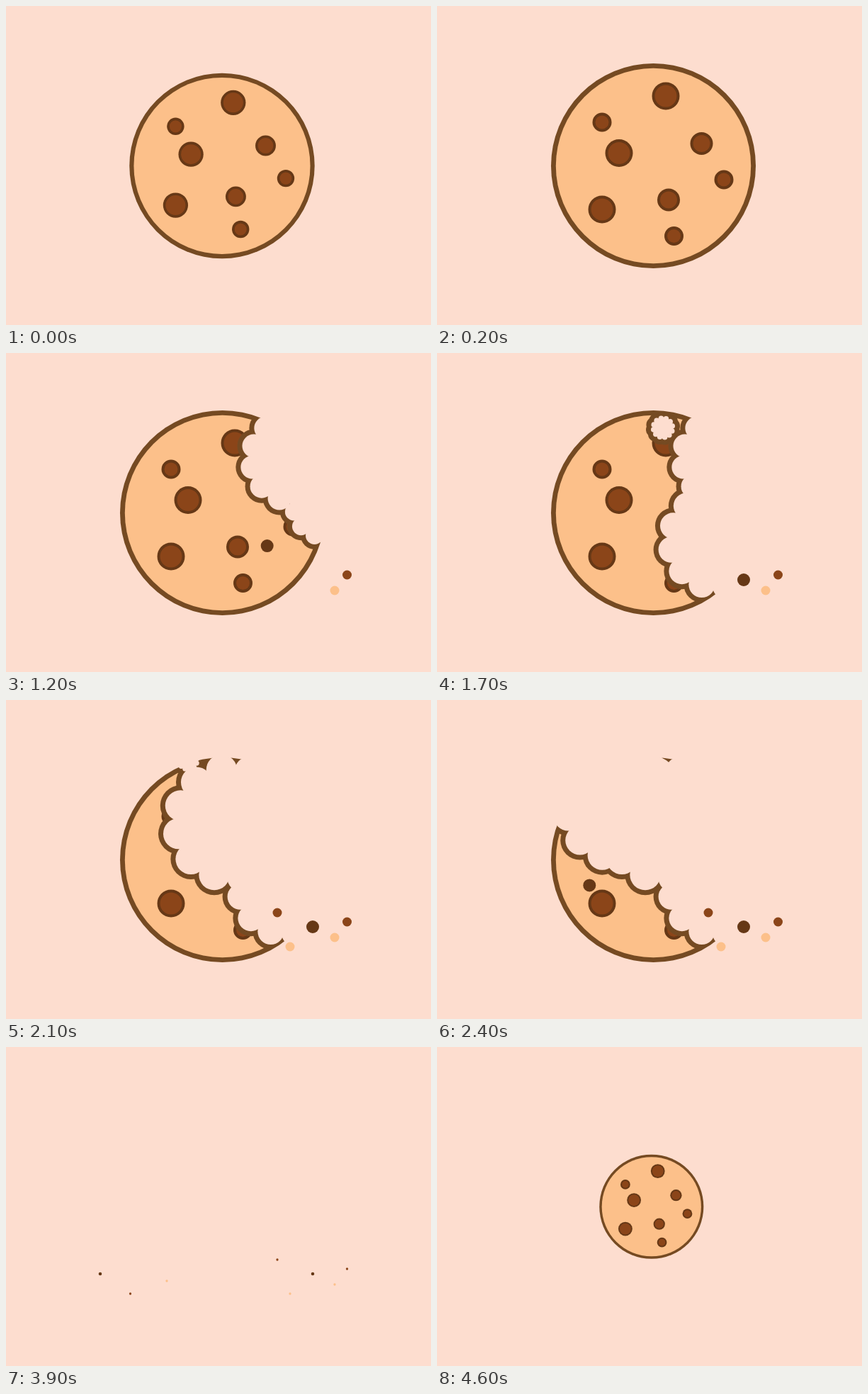
These frames come from a looping animation (600 px wide and 450 px high, 4.7 s). An HTML page with a canvas:

```html
<!DOCTYPE html>
<html lang="en">
<head>
<meta charset="utf-8">
<title>Cookie</title>
<style>
  html, body { margin: 0; width: 100%; height: 100%; overflow: hidden; background: #fdddcf; }
  canvas { display: block; }
</style>
</head>
<body>
<canvas id="stage" width="600" height="450"></canvas>
<script>
const ctx = document.getElementById('stage').getContext('2d');
const LOOP = 4700, STEP = 100, TAU = Math.PI * 2;
const TAN = '#fcc08a', EDGE = '#754a22', CHIP = '#8b4519', DARK = '#663816';
const cookie = { x: 305.5, y: 225.5, r: 144.5 };
const GONE = 2900, REBIRTH = 4433;

// chip places by radius
const chips = {
  19.5: [[323, 127], [257, 207.5], [233, 287]],
  16: [[373.5, 194], [327, 273.5]],
  13.5: [[233, 164], [405, 245], [334.5, 324.5]]
};

// bites in order, each with the resting places of its crumbs
const bites = [
  { x: 405, y: 150, r: 63 },
  { x: 450, y: 215.5, r: 48, brown: [481.5, 313], tan: [464, 335] },
  { x: 395, y: 265, r: 70.5, dark: [433, 320] },
  { x: 319, y: 174, r: 83 },
  { x: 257, y: 150, r: 79, brown: [383, 300], tan: [401, 348] },
  { x: 177, y: 249, r: 64, dark: [133, 320] },
  { x: 295, y: 305, r: 100, brown: [175.5, 348], tan: [227, 330] }
];
bites.forEach((b, i) => b.start = 460 + 400 * i);

const clamp = v => Math.max(0, Math.min(1, v));
const progress = (t, start, time) => clamp((t - start) / time);
const ease = p => p * p * (3 - 2 * p);
const mix = (a, b, p) => a + (b - a) * p;

function disc(x, y, r, fill) {
  ctx.fillStyle = fill;
  ctx.beginPath();
  ctx.arc(x, y, r, 0, TAU);
  ctx.fill();
}

function rimmed(x, y, r, rim, fill, edge) {
  disc(x, y, r, edge);
  disc(x, y, r - rim, fill);
}

// A ring of scallops that grows from its top, widened by a margin
function drawBite(bite, t, margin) {
  const s = ease(progress(t, bite.start, 150));
  if (!s) return;
  const n = 12, turn = 0.07, r = bite.r * s;
  const y = bite.y - bite.r + r;
  const half = r * Math.sin(Math.PI / n), inner = r * Math.cos(Math.PI / n);
  disc(bite.x, y, inner + margin, EDGE);
  for (let i = 0; i < n; i++) {
    const a = turn + (i + 0.5) * TAU / n, d = inner - half * 0.16;
    disc(bite.x + d * Math.cos(a), y + d * Math.sin(a), half * 1.01 + margin, EDGE);
  }
}

function drawCookie(t) {
  const reborn = t > REBIRTH;
  const s = ease(progress(reborn ? t : t + LOOP, REBIRTH, 330));
  ctx.save();
  ctx.translate(300, 225);
  ctx.scale(s, s);
  ctx.translate(-300, -225);
  rimmed(cookie.x, cookie.y, cookie.r, 6.8, TAN, EDGE);
  for (const r in chips)
    for (const [x, y] of chips[r]) rimmed(x, y, +r, 4, CHIP, DARK);
  ctx.restore();

  if (reborn) return;
  // paint the brown borders on the cookie, then cut the bites out
  ctx.globalCompositeOperation = 'source-atop';
  for (const b of bites) drawBite(b, t, 7);
  ctx.globalCompositeOperation = 'destination-out';
  for (const b of bites) drawBite(b, t, 0);
  ctx.globalCompositeOperation = 'source-over';
}

// Crumbs leave between the bite and the cookie's middle, then fall
function drawCrumbs(bite, t) {
  const start = bite.start - 65;
  if (t < start) return;
  const p = progress(t, start, 105), size = 1 - progress(t, 3430, 630);
  const x = mix(bite.x, cookie.x, 0.33), y = mix(bite.y, cookie.y, 0.33) + 20;
  const crumb = (to, r, fill) =>
    to && disc(mix(x, to[0], p), mix(y, to[1], p * p), r * size, fill);
  crumb(bite.dark, 9, DARK);
  crumb(bite.brown, 6.5, CHIP);
  crumb(bite.tan, 6.5, TAN);
}

const begin = performance.now();

function frame() {
  const t = Math.floor((performance.now() - begin) % LOOP / STEP) * STEP;
  ctx.clearRect(0, 0, 600, 450);
  if (t < GONE || t > REBIRTH) drawCookie(t);
  if (t < 4100) for (const b of bites) drawCrumbs(b, t);
  requestAnimationFrame(frame);
}
frame();
</script>
</body>
</html>
```
